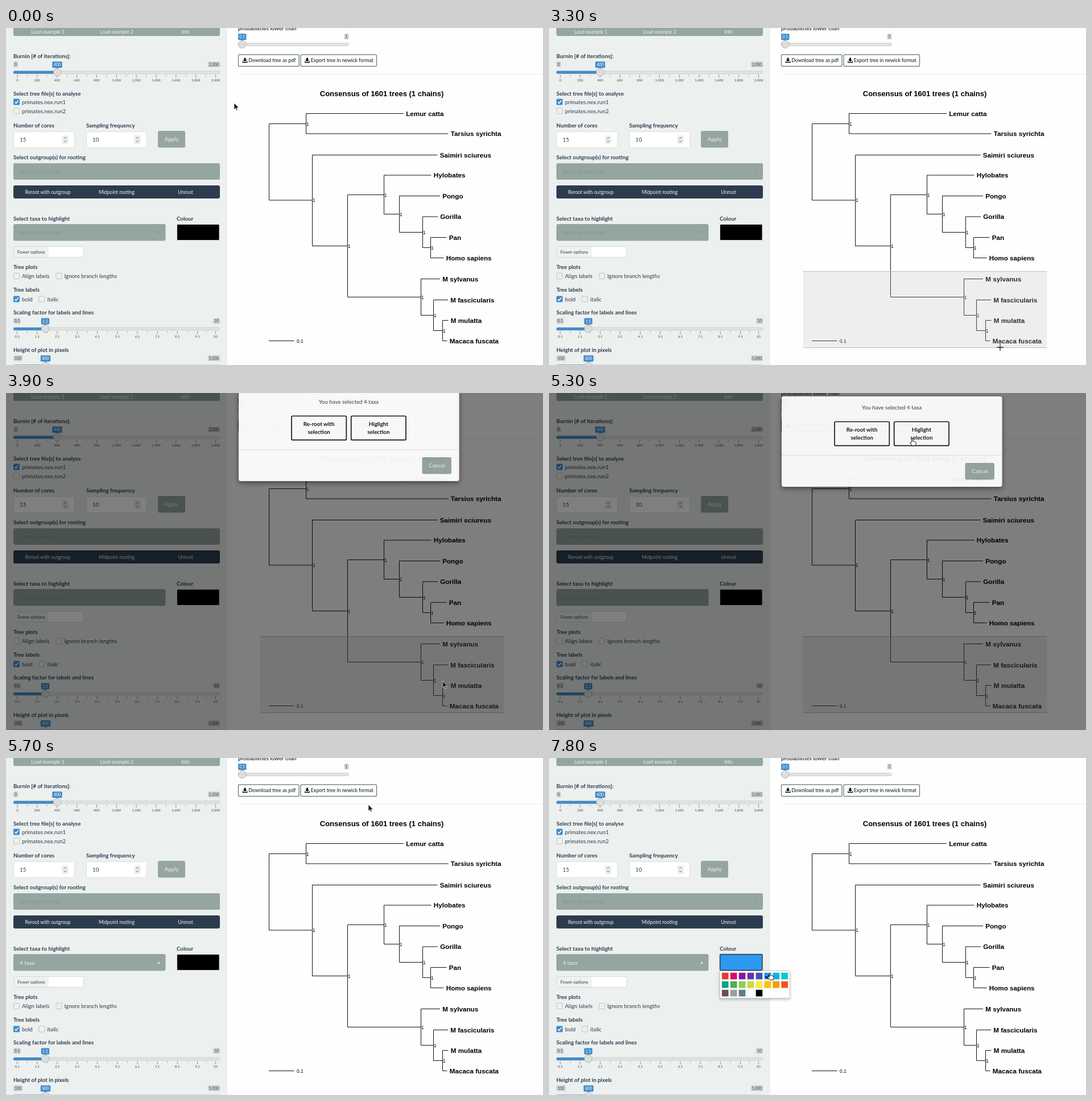
An HTML page that plays this animation: 944 px wide and 593 px high, repeating every 8000 ms.

```html
<!DOCTYPE html>
<html lang="en">
<head>
<meta charset="utf-8">
<title>Consensus tree</title>
<style>
html, body { margin: 0; width: 100%; height: 100%; overflow: hidden; background: #fefefe; }
svg { display: block; width: 100vw; height: 100vh; font-family: Lato, sans-serif; }
#tree { font-family: "Liberation Sans", Arial, sans-serif; }
.anim { animation: 8s step-end infinite; }

#cursor { animation-name: move; }
#arrow { animation-name: arrow; }
#cross { animation-name: cross; }
#hand { animation-name: hand; }
#brush { animation-name: brush; }
#brushBox { animation-name: drag; transform-origin: 0 428px; }
#brushEnd { animation-name: dragEnd; }
#backdrop { animation-name: dim; }
#modal { animation-name: modal; }
#empty { animation-name: before; }
#chosen { animation-name: after; }
#palette { animation-name: palette; }
.old { animation-name: oldColour; }
.new { animation-name: newColour; }

@keyframes move {
  0% { transform: translate(401px, 132px); }
  7.5% { transform: translate(401px, 132px); animation-timing-function: steps(3); }
  11.25% { transform: translate(631px, 328px); }
  12.5% { transform: translate(631px, 328px); animation-timing-function: steps(4); }
  17.5% { transform: translate(759px, 415px); }
  18.75% { transform: translate(759px, 415px); animation-timing-function: steps(4); }
  23.75% { transform: translate(780px, 428px); }
  27.5% { transform: translate(780px, 428px); animation-timing-function: steps(9); }
  38.75% { transform: translate(793px, 553px); animation-timing-function: steps(2); }
  41.25% { transform: translate(793px, 562px); }
  47.5% { transform: translate(793px, 562px); animation-timing-function: steps(5); }
  53.75% { transform: translate(666px, 287px); }
  55% { transform: translate(666px, 287px); animation-timing-function: steps(6); }
  62.5% { transform: translate(637px, 82px); }
  71.25% { transform: translate(637px, 82px); animation-timing-function: steps(4); }
  76.25% { transform: translate(416px, 342px); animation-timing-function: steps(3); }
  80% { transform: translate(323px, 360px); }
  85% { transform: translate(323px, 360px); animation-timing-function: steps(5); }
  91.25%, 100% { transform: translate(387px, 380px); }
}
@keyframes arrow {
  0%, 45%, 71.25% { opacity: 1; }
  10%, 62.5%, 80%, 100% { opacity: 0; }
}
@keyframes cross { 0%, 45%, 100% { opacity: 0; } 10% { opacity: 1; } }
@keyframes hand { 0%, 71.25% { opacity: 0; } 62.5%, 80%, 100% { opacity: 1; } }
@keyframes brush { 0%, 68.75%, 100% { opacity: 0; } 28.75% { opacity: 1; } }
@keyframes drag {
  0% { transform: scaleY(0); }
  27.5% { transform: scaleY(0); animation-timing-function: steps(9); }
  38.75% { transform: scaleY(125); animation-timing-function: steps(2); }
  41.25%, 100% { transform: scaleY(134); }
}
@keyframes dragEnd {
  0% { transform: translateY(0); }
  27.5% { transform: translateY(0); animation-timing-function: steps(9); }
  38.75% { transform: translateY(125px); animation-timing-function: steps(2); }
  41.25%, 100% { transform: translateY(134px); }
}
@keyframes dim {
  0%, 71.25%, 100% { opacity: 0; }
  45% { opacity: .08; }
  46.25% { opacity: .38; }
  47.5% { opacity: .5; }
  70% { opacity: .4; }
}
@keyframes modal {
  0%, 68.75%, 100% { opacity: 0; transform: translateY(-26px); }
  47.5% { opacity: .3; transform: translateY(-26px); }
  48.75% { opacity: .95; transform: translateY(-10px); }
  50% { opacity: 1; transform: translateY(-1px); }
  51.25% { opacity: 1; transform: translateY(2px); }
  66.25% { opacity: .93; transform: translateY(0); }
  67.5% { opacity: .3; transform: translateY(-20px); }
}
@keyframes before { 0% { opacity: 1; } 68.75%, 100% { opacity: 0; } }
@keyframes after { 0% { opacity: 0; } 68.75%, 100% { opacity: 1; } }
@keyframes palette { 0% { opacity: 0; } 81.25%, 100% { opacity: 1; } }
@keyframes oldColour { 0% { opacity: 1; } 97.5%, 100% { opacity: 0; } }
@keyframes newColour { 0% { opacity: 0; } 97.5%, 100% { opacity: 1; } }
</style>
</head>
<body>
<svg viewBox="0 0 944 593" preserveAspectRatio="none">
  <defs>
    <filter id="shadow" x="-10%" y="-20%" width="120%" height="150%">
      <feDropShadow dx="0" dy="3" stdDeviation="5" flood-opacity=".5"/>
    </filter>
    <filter id="soft" x="-10%" y="-20%" width="120%" height="150%">
      <feDropShadow dx="0" dy="2" stdDeviation="2.5" flood-opacity=".25"/>
    </filter>
  </defs>
  <rect width="944" height="593" fill="#fefefe"/>
  <rect width="389" height="593" fill="#ecf0ee"/>
  <g id="panel"></g>
  <g id="main"></g>
  <g id="tree"></g>
  <g id="brush" class="anim">
    <rect id="brushBox" class="anim" x="446.5" y="428" width="429" height="1" fill="#c0c0c0" fill-opacity=".25"/>
    <path d="M446.5 428.5h429" stroke="#bbb"/>
    <path id="brushEnd" class="anim" d="M446.5 428.5h429" stroke="#bbb"/>
  </g>
  <g id="palette" class="anim"></g>
  <rect id="backdrop" class="anim" width="944" height="593"/>
  <g id="modal" class="anim"></g>
  <g id="cursor" class="anim">
    <path id="arrow" class="anim" d="M0 0V11.4L2.7 9 4.5 13 6.3 12.2 4.6 8.4H8.2Z" fill="#111" stroke="#fff" stroke-width=".7"/>
    <g id="cross" class="anim">
      <path d="M-6.5 0h13M0 -6.5v13" stroke="#fff" stroke-width="2.4" opacity=".6"/>
      <path d="M-6 0h12M0 -6v12" stroke="#222" stroke-width="1.3"/>
    </g>
    <path id="hand" class="anim" d="M.6 5V-.6a1.1 1.1 0 0 1 2.2 0V3q1.2-.8 1.9.3 1.3-.6 1.8.5 1.6-.2 1.6 1.3V7.4L7 10.6H1.5L-2.4 5.7q.6-1.5 1.8-.6Z" fill="#fff" stroke="#111" stroke-width="1"/>
  </g>
</svg>
<script>
const INK = '#2c3e50', GREY = '#95a5a0', BLUE = '#428bca', PALE = '#eef2f0';
const byId = id => document.getElementById(id);

const text = (x, y, str, { size = 9.75, fill = INK, bold, mid } = {}) =>
  `<text x="${x}" y="${y}" font-size="${size}" fill="${fill}"${bold ? ' font-weight="700"' : ''}${mid ? ' text-anchor="middle"' : ''}>${str}</text>`;
const label = (x, y, str) => text(x, y, str, { bold: true });
const centred = (x, y, str, size = 8.5, fill = PALE) => text(x, y, str, { size, fill, mid: true });
// Box given by its edges.
const box = (l, t, r, b, fill, extra = '') =>
  `<rect x="${l}" y="${t}" width="${r - l}" height="${b - t}" fill="${fill}" ${extra}/>`;
const line = (d, stroke = '#111', width = 1) =>
  `<path d="${d}" fill="none" stroke="${stroke}" stroke-width="${width}"/>`;
const caret = (x, y, dir, fill) => `<path d="M${x - 2.6} ${y - dir * 1.4}h5.2l-2.6 ${dir * 2.8}z" fill="${fill}"/>`;

function slider({ left, right, top, knob, min, max, value, ticks = [] }) {
  const tag = (l, r, str) => box(l, top, r, top + 10, '#cdd2d0', 'rx="1.5"') +
    centred((l + r) / 2, top + 7.5, str, 6.8, '#444');
  const width = str => str.replace(/[.,]/g, '').length * 4 + (/[.,]/.test(str) ? 5 : 4);
  const half = width(value) / 2 + .7, track = top + 16.5;
  const grid = ticks.map(([x, str], i) => {
    const next = ticks[i + 1];
    return line(`M${x} ${track + 6.5}v5.5`, '#777', .8) +
      (next ? line(`M${(x + next[0]) / 2} ${track + 6.5}v3`, '#888', .7) : '') +
      centred(x, track + 18, str, 6, '#444');
  }).join('');
  return grid + tag(left, left + width(min), min) + tag(right - width(max), right, max) +
    box(left, track, right, track + 5, '#dfe3e2', 'rx="2.5" stroke="#c4c9c7" stroke-width=".7"') +
    box(left, track, knob, track + 5, BLUE, 'rx="2"') +
    box(knob - half, top, knob + half, top + 11, BLUE, 'rx="1.5"') +
    caret(knob, top + 12, 1, BLUE) +
    centred(knob, top + 8, value, 7, '#fff') +
    `<circle cx="${knob}" cy="${track + 2.2}" r="6.8" fill="#dcdedd" stroke="#ababab" stroke-width=".8"/>`;
}

function checkbox(x, y, str, on) {
  return box(x + .5, y, x + 10.5, y + 10, on ? BLUE : '#eef1ef', `rx="1" stroke="${on ? BLUE : '#bcc4c1'}"`) +
    (on ? line(`M${x + 2.5} ${y + 5.2}l2.2 2.3 4-5`, '#fff', 1.5) : '') + text(x + 15, y + 8.7, str);
}

function numberInput(l, r, str) {
  const x = r - 16.5;
  return box(l + .5, 182.5, r, 210.5, '#fff', 'rx="3" stroke="#dbe2e0"') + text(l + 11, 200, str) +
    box(x - 5.5, 189, x + 5.5, 204, '#ededed') +
    line(`M${x - 2} 194.5l2-2 2 2M${x - 2} 198.5l2 2 2-2`, '#555', 1);
}

const group = (t, b, fill, y, names) => box(13, t, 376, b, fill, 'rx="3"') +
  names.map((name, i) => centred(73.5 + 121 * i, y, name)).join('');

const FAINT = '#85968f';
byId('panel').innerHTML = [
  group(-8, 14, GREY, 9.5, ['Load example 1', 'Load example 2', 'Info']),
  label(13, 53, 'Burnin [# of iterations]:'),
  slider({ left: 13, right: 376, top: 59, knob: 90, min: '0', max: '2,000', value: '400',
    ticks: Array.from({ length: 11 }, (_, i) => [20 + 34.85 * i, (200 * i).toLocaleString('en-US')]) }),
  label(13, 118.5, 'Select tree file[s] to analyse'),
  checkbox(13, 125, 'primates.nex.run1', true),
  checkbox(13, 141, 'primates.nex.run2'),
  label(13, 175, 'Number of cores'), label(141, 175, 'Sampling frequency'),
  numberInput(13, 120.5, '15'), numberInput(141, 247.5, '10'),
  box(267, 181, 315, 210.5, GREY, 'rx="3"'), centred(291, 199, 'Apply', 9.75),
  label(13, 231, 'Select outgroup(s) for rooting'),
  box(13, 238, 376, 267, GREY, 'rx="3"'),
  text(24, 256, 'Nothing selected', { fill: FAINT }), caret(364, 252.5, 1, FAINT),
  group(277, 300, '#2c3c4e', 291.5, ['Reroot with outgroup', 'Midpoint rooting', 'Unroot']),
  label(13, 338.5, 'Select taxa to highlight'), label(300, 338.5, 'Colour'),
  box(13, 345, 280.5, 374.5, GREY, 'rx="3"'),
  `<g id="empty" class="anim">${text(24, 363.5, 'Nothing selected', { fill: FAINT })}${caret(268, 360, 1, FAINT)}</g>`,
  `<g id="chosen" class="anim">${text(24, 363.5, '4 taxa', { fill: PALE })}${caret(268.5, 360, -1, PALE)}</g>`,
  box(300.5, 345.5, 375, 373.5, '#000', 'rx="1.5" stroke="#cfd6d3"'),
  box(13.5, 384.5, 136.5, 403.5, '#fff', 'rx="2" stroke="#d3dad7"'),
  box(14, 385, 75, 403, '#eef2f0'), text(20, 397, 'Fewer options', { size: 7.8 }),
  label(13, 424, 'Tree plots'),
  checkbox(13, 431.5, 'Align labels'), checkbox(87.5, 431.5, 'Ignore branch lengths'),
  label(13, 464, 'Tree labels'),
  checkbox(13, 472, 'bold', true), checkbox(57.5, 472, 'italic'),
  label(13, 504, 'Scaling factor for labels and lines'),
  slider({ left: 13, right: 376, top: 510.5, knob: 69, min: '0.1', max: '10', value: '1.5',
    ticks: Array.from({ length: 11 }, (_, i) => i < 10 ? [19.7 + 35.2 * i, i + '.1'] : [368.3, '10']) }),
  label(13, 569.5, 'Height of plot in pixels'),
  slider({ left: 13, right: 376, top: 576, knob: 69.5, min: '100', max: '5,000', value: '800' }),
].join('');

const download = (l, r, str) => box(l + .5, 46.8, r - .5, 67.3, '#fff', 'rx="2" stroke="#5d7769" stroke-width="1.2"') +
  `<path d="M${l + 10.5} 52.5h3v3.2h2.3l-3.8 3.6-3.8-3.6h2.3z" fill="#111"/>` +
  line(`M${l + 8.3} 58.5v2h7.4v-2`, '#111', 1.5) +
  text(l + 18.2, 60.3, str, { size: 8.8, fill: '#111' });

byId('main').innerHTML = [
  label(408, 3.5, 'probabilities lower than'),
  slider({ left: 408, right: 602.5, top: 10, knob: 415.2, min: '', max: '1', value: '0.5' }),
  download(408, 515.5, 'Download tree as pdf'),
  download(517.5, 652, 'Export tree in newick format'),
  line('M408 81.5H944', '#ededed'),
].join('');

// Tips are [x, y, name]; inner nodes are [x, y, upper, lower].
const root = [462.5, 236,
  [527.5, 168.5, [699, 150.5, 'Lemur catta'], [777.5, 186, 'Tarsius syrichta']],
  [538.5, 303,
    [758.5, 223.5, 'Saimiri sciureus'],
    [600.5, 383.5,
      [664.5, 293.5,
        [747.5, 259, 'Hylobates'],
        [691.5, 327.5,
          [763, 295.5, 'Pongo'],
          [732.5, 359.5,
            [759, 332, 'Gorilla'],
            [746.5, 386.5, [774.5, 368.5, 'Pan'], [769.5, 404.5, 'Homo sapiens']]]]],
      [729.5, 473.5,
        [763, 441.5, 'M sylvanus'],
        [751.5, 505.5,
          [777, 478.5, 'M fascicularis'],
          [767.5, 532.5, [777.5, 514.5, 'M mulatta'], [775.5, 550.5, 'Macaca fuscata']]]]]]];

function branch([x, y, upper, lower]) {
  if (!lower) return text(x + 4.2, y + 4, upper, { size: 11.7, fill: '#000', bold: true });
  return line(`M${upper[0]} ${upper[1]}H${x}V${lower[1]}H${lower[0]}`) +
    (x > 500 ? text(x + .2, y + 3.2, '1', { size: 8.7, fill: '#000' }) : '') +
    branch(upper) + branch(lower);
}

byId('tree').innerHTML = branch(root) +
  text(660.5, 119.7, 'Consensus of 1601 trees (1 chains)', { size: 13, fill: '#000', bold: true, mid: true }) +
  line('M462 550.5H506.5') + text(511, 553.5, '0.1', { size: 8.3, fill: '#000' });

const swatches = `e53935 d8096b 8e10aa 5e35b1 3f51b5 2196f3 08b4f5 00cbd0
  00a287 4caf50 8bd04a cddc39 ffee33 ffc107 ff9800 f4511e
  6d4c48 9e9e9e 607d8b ffffff 000000`.split(/\s+/);
const tick = (col, row, stroke) =>
  line(`M${306 + 14.9 * col} ${384 + 15 * row}l2.8 3 5-6.4`, stroke, 1.9);

byId('palette').innerHTML =
  box(300.5, 374.5, 423, 422.5, '#fff', 'stroke="#ccc" filter="url(#soft)"') +
  swatches.map((hex, i) => {
    const x = 303.8 + 14.9 * (i % 8), y = 377.8 + 15 * Math.floor(i / 8);
    return box(x, y, x + 12, y + 12, '#' + hex, 'stroke="#ddd" stroke-width=".6"');
  }).join('') +
  box(300.5, 345.5, 375, 373.5, '#000', 'rx="1.5" stroke="#2c3440" stroke-width="1.3"') +
  `<g class="anim old">${tick(4, 2, '#fff')}</g>` +
  `<g class="anim new">${box(301.2, 346.2, 374.4, 372.9, '#2c9aee')}${tick(5, 0, '#111')}</g>`;

const choice = (l, r, top) => box(l, 50.5, r, 92.7, '#fff', 'rx="2" stroke="#111" stroke-width="1.7"') +
  [top, 'selection'].map((str, i) =>
    text((l + r) / 2, 67.8 + 14 * i, str, { fill: '#111', bold: true, mid: true })).join('');

byId('modal').innerHTML = [
  box(409, 6, 796.5, 165, '#fff', 'rx="4" filter="url(#shadow)"'),
  centred(602.5, 29, 'You have selected 4 taxa', 9.75, INK),
  choice(502, 598.3, 'Re-root with'), choice(606.7, 703, 'Higlight'),
  line('M409 109.7H796.5', '#dfe3e1'),
  box(731.5, 123, 783, 152.5, GREY, 'rx="3"'), centred(757.3, 141, 'Cancel', 9.75),
].join('');

// The lower bound sits under the knob here, so its tag stays hidden.
</script>
</body>
</html>
```
